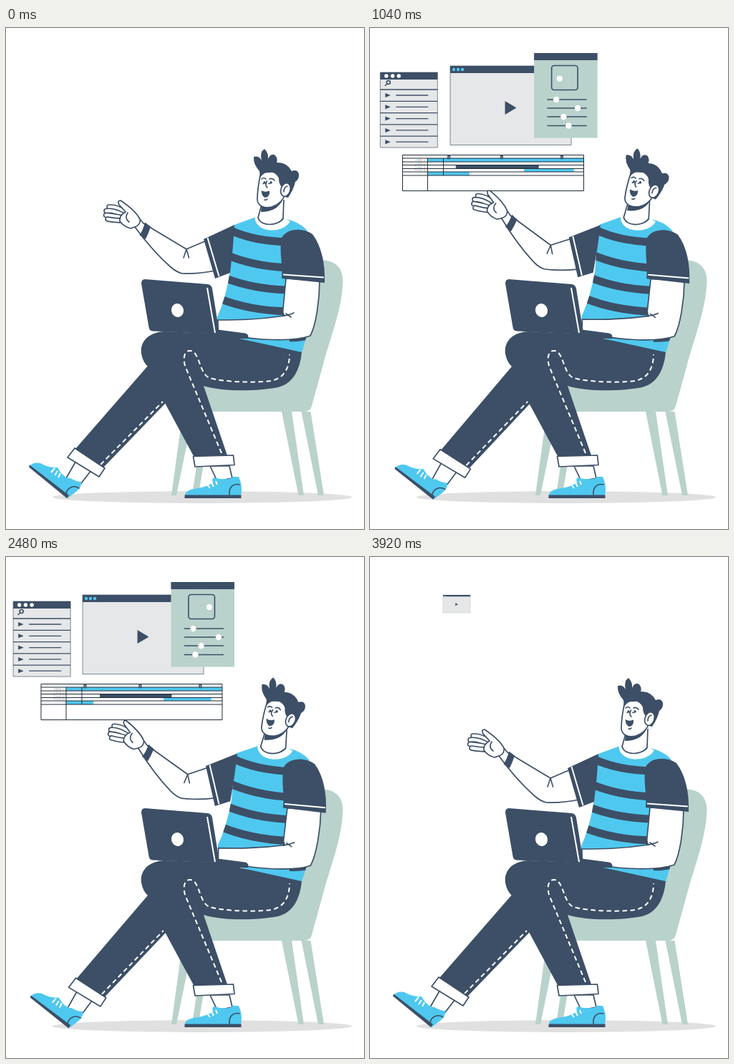
Animation of 500x700 px, one loop 4 s. Source, as an HTML page:

```html
<!DOCTYPE html>
<html lang="en">
<head>
<meta charset="utf-8">
<title>Video editor at work</title>
<style>
html, body { margin: 0; width: 100%; height: 100%; overflow: hidden; background: #fff; }
svg { display: block; width: 500px; height: 700px; }
.d { fill: #3c4f66; }
.b { fill: #4fc8ef; }
.g { fill: #b9d2cc; }
.w { fill: #fff; }
.s { fill: #e6e7e8; }
.o { fill: #fff; stroke: #3c4f66; stroke-width: 1.7; stroke-linejoin: round; }
.l { fill: none; stroke: #3c4f66; stroke-width: 1.6; stroke-linecap: round; }
.wl { fill: none; stroke: #fff; stroke-width: 2; }
.dash { stroke-dasharray: 6.5 4.5; }
.frame { stroke: #7d8792; stroke-width: 1; }
.row { stroke: #3c4f66; stroke-width: 1.3; }
.stripe { fill: none; stroke: #3c4f66; stroke-width: 11; }
.collar { fill: none; stroke: #fff; stroke-width: 9; }
.thin { fill: none; stroke: #222b38; stroke-width: 1; }
.finger { stroke-width: 7.5; }
.finger-fill { stroke-width: 4.3; stroke-linecap: round; }
text { font: 4.5px Arial, "Liberation Sans", sans-serif; fill: #aaa; }
</style>
</head>
<body>
<svg viewBox="0 0 500 700">
  <defs>
    <path id="shirt" d="M349 264L319 275Q315 300 313 340Q307 378 295 404L296 426L340 438L413 454L420 430L425 300L420 282Q408 270 391 267Z"/>
    <clipPath id="shirtClip"><use href="#shirt"/></clipPath>
  </defs>

  <ellipse cx="274" cy="655.5" rx="209" ry="8.5" fill="#e0e0e0"/>

  <g id="video">
    <path class="s frame" d="M0 0H169V110.500H0Z"/>
    <path class="d" d="M0 0H169V10H0ZM76.500 49V68L92.500 58.500Z"/>
    <g id="videoDots" class="b"></g>
  </g>
  <g id="list">
    <path class="s frame" d="M0-105H80V0H0Z"/>
    <path class="d" d="M0-105H80V-95H0Z"/>
    <circle class="l" cx="11.500" cy="-91" r="2.500"/><path class="l" d="M9.500-89L7-86.500"/>
    <g id="listRows"></g>
  </g>
  <g id="panel">
    <path class="g" d="M0 0H88.500V118.500H0Z"/>
    <path class="d" d="M0 0H88.500V10H0Z"/>
    <rect class="l" x="24.500" y="17.500" width="36.500" height="34" rx="3.500"/>
    <path class="l" d="M19 65H73M19 77H73M19 89H73M19 101.500H73"/>
    <g id="knobs" class="w"></g>
  </g>
  <g id="timeline">
    <path class="w" d="M0 0H253V50H0Z"/>
    <path class="b" d="M35 4.500H253V9.500H35Z"/>
    <g id="bars"></g>
    <path class="thin" d="M0 0H253V50H0ZM0 4.500H253M0 9.500H253M0 14H253M0 19H253M0 23.500H253M0 28.500H253M35 4.500V50M57 4.500V28.500"/>
    <g id="labels"></g>
    <g id="markers"></g>
  </g>

  <!-- chair -->
  <path class="g" d="M440 324C463 325 471 338 470.500 355C469 395 452 435 443 470L427 528Q425 536 416 536H250L270 490L400 450L400 330Z"/>
  <path class="g" d="M247 536H262L238 653H231ZM278 536H288L270 645H261ZM385 536H399L416 653H408.500ZM412.500 536H425.500L444 653H436Z"/>

  <g id="body">
    <g id="arm">
      <g id="fingers"></g>
      <path class="o" d="M312 290L280 297L252 309L192 273L187 267Q181 255 160 241Q155 241 158 247L167 257Q158 262 159 270Q165 278 174 280L180 278Q205 312 230 334Q238 341 246 343Q268 344 292 339L314 330Z"/>
      <path class="d" d="M194 271.500L202 277.500Q199 287 195 295L186.500 289.500Q192 281 194 271.500Z"/>
      <path class="l" d="M252 309L248 321M252 309L255.500 321M187 268Q188 275 180 278M170 258Q165 266 172 271"/>
    </g>
    <use href="#shirt" class="b"/>
    <g clip-path="url(#shirtClip)" class="stripe">
      <path d="M312 282Q345 298 395 299M308 317Q345 333 395 335M305 349Q345 365 395 366M298 378Q340 395 395 396"/>
      <path d="M396 434Q408 435 425 431" stroke-width="8"/>
    </g>
    <g id="sleeve">
      <path class="d" d="M319 275L276 295L292 350L313 342L317 305Z"/>
      <path class="wl" d="M281.500 293L297.500 347"/>
    </g>
    <path class="collar" d="M352 264C352 281 384 283 393 268"/>
    <path class="o" d="M357 247L352 265C356 278 380 277 387 266L388 240"/>
    <path class="o" d="M391 350L387 392Q386 399 389 402C350 408 320 408 296 408V424C335 437 400 439 425 430C433 415 438 380 438 352Z"/>
    <path class="l" d="M386 402.500Q396 401 402 398M391 399L398 404"/>
    <path class="d" d="M385 293C392 280 414 278 428 288C441 305 446 330 445 356L385 350C387 330 381 312 385 293Z"/>
    <path class="wl" d="M387 344.500L444 348.500"/>
    <g id="head">
      <path class="d" d="M357 247Q370 252 386 241Q378 257 356 257Z"/>
      <path class="o" d="M356 202C353 215 351 230 351 240C352 250 362 252 371 250C382 247 389 238 390 230L388 200Z"/>
      <path class="d" d="M355 209L354 200Q345 190 346 180Q353 178 357 185Q354 173 361 169Q367 175 366 183Q370 174 376 178Q380 183 378 188Q392 187 399 200Q407 197 409 204Q410 211 404 215Q402 225 394 237L386 235L385 222Q381 218 381 210Q378 203 370 201Q361 200 355 209Z"/>
      <ellipse class="o" cx="390.500" cy="226" rx="6.500" ry="9.500" transform="rotate(18 390.500 226)"/>
      <path class="l" d="M388 229Q388 222 393 221M357 211Q360 208 363 211M368 211Q372 209 375 213M364.500 214Q361 220 365 223M359 217.500L362 216.500M367 217.500L371 216.500M361 240Q363 241 365 239"/>
      <circle class="d" cx="361" cy="215.500" r="1.500"/><circle class="d" cx="370" cy="215.500" r="1.500"/>
      <path class="d" d="M356.500 227Q362 230 368 227.500Q369 236 362 237Q357 235 356.500 227Z"/>
    </g>
  </g>

  <!-- far leg, swings slightly at the knee -->
  <g id="leg">
    <path class="o" d="M99 603L84 629L102 640L119 618Z"/>
    <path class="b" d="M33 612Q38 606 48 608Q60 615 72 614L75 619Q82 629 90 629Q98 634 105.500 634Q106 641 99 647L86 657Z"/>
    <path class="d" d="M33 610.500L88 653L85 657L32 613.500Z"/>
    <path class="l" d="M84 651C85 642 95 638 102 643"/>
    <path class="wl" d="M63 621L68 615M68 625L72 619M73 628L76 622"/>
    <path class="d" d="M199 471L97 588L136 614L223 524L245 460Z"/>
    <path class="wl dash" d="M132 610L219 522"/>
    <path class="o" d="M96 587L138 615L130 627L86 600Z"/>
  </g>

  <!-- near leg -->
  <path class="o" d="M285 612L295 633L316 629L312 612Z"/>
  <path class="b" d="M250 653Q250 645 268 643Q281 641 289 635Q287 629 291 628Q299 631 306 630Q313 631 317 627L325 627Q331 640 328 653Z"/>
  <path class="d" d="M249.500 652.500H328.500V657H249.500Z"/>
  <path class="l" d="M312 652C311 641 318 636 326 638"/>
  <path class="wl" d="M281 638L285 643M287 635L290 641M293 633L295 638"/>
  <path class="d" d="M413 453L340 437L292 427L222 424C197 425 187 440 189 455Q191 467 199 474L222 524L263 600H310L276 500C300 508 350 508 380 502C402 497 411 475 413 453Z"/>
  <path class="wl dash" d="M301 594L250 472C246 456 252 450 258 451C271 453 270 485 285 489C305 495 350 496 370 493C388 490 396 475 396 456"/>
  <path class="o" d="M261.500 598.500L317.500 597L319 610.500L264 613Z"/>

  <!-- laptop -->
  <path class="d" d="M292 421L334 426.500Q340 428 338 434L320 434L292 428Z"/>
  <path class="d" d="M194 351L282 358Q287 359 288 364L297.500 423Q297 427 293 427.500L205 423.500Q200 423 199.500 418L189 357Q189 351 194 351Z"/>
  <path class="wl" d="M281 363L292 426"/>
  <ellipse class="w" cx="239.500" cy="394.500" rx="8.500" ry="9.500" transform="rotate(-15 239.500 394.500)"/>
</svg>
<script>
const $ = id => document.getElementById(id);
const LOOP = 4000, STEP = 80;
const smooth = u => (u = Math.max(0, Math.min(1, u)), u * u * (3 - 2 * u));
const deg = rad => rad * 180 / Math.PI;
const circle = (x, y, r) => `<circle cx="${x}" cy="${y}" r="${r}"/>`;
const rect = (cls, x, y, w, h) => `<rect class="${cls}" x="${x}" y="${y}" width="${w}" height="${h}"/>`;

// Eased value from [time, value, time, value, ...]
function track(t, ...k) {
  let i = 0;
  while (i < k.length - 4 && t > k[i + 2]) i += 2;
  return k[i + 1] + (k[i + 3] - k[i + 1]) * smooth((t - k[i]) / (k[i + 2] - k[i]));
}

$('videoDots').innerHTML = [5, 11, 17].map(x => circle(x, 5, 2.2)).join('');
$('listRows').innerHTML = '<g class="w">' + [8.5, 17.3, 26].map(x => circle(x, -100, 2.7)).join('') + '</g>' +
  [0, 1, 2, 3, 4].map(i => {
    const y = -81 + i * 16.3;
    return `<path class="row" d="M0 ${y}H80M22 ${y + 8}H67"/>
      <path class="d" d="M7 ${y + 5}V${y + 11}L14.500 ${y + 8}Z"/>`;
  }).join('');
$('labels').innerHTML = [1, 2, 3, 4].map(i => `<text x="17" y="${4.2 + i * 4.7}">Track ${i}</text>`).join('');
$('fingers').innerHTML = ['M167 258Q155 249 144 250', 'M163 261Q150 254 140 255.5',
  'M163 265Q150 262 139.5 261.5', 'M165 269Q152 269 142 267'].map(d =>
  `<path class="l finger" d="${d}"/><path class="wl finger-fill" d="${d}"/>`).join('');

function draw(t) {
  const edge = Math.min(t, LOOP - t);
  const wave = Math.cos(2 * Math.PI * t / LOOP);
  const place = (id, x, y, start) =>
    $(id).setAttribute('transform', `translate(${x} ${y}) scale(${smooth((edge - start) / 260)})`);
  const turn = (id, angle, x, y) => $(id).setAttribute('transform', `rotate(${deg(angle)} ${x} ${y})`);

  place('video', 115.7 - .0035 * t, 53, 0);
  place('list', 17.3 - .0029 * t, 167, 353);
  place('panel', 229 - 2 * wave, 35, 200);
  place('timeline', 43 + .0024 * t, 177.5, 120);

  const slide = (a, b, c) => track(t, 800, a, 1300, b, 2600, b, 3000, c);
  $('knobs').innerHTML = [
    [track(t, 800, 34.5, 1300, 37, 1800, 37, 2300, 53.5), track(t, 800, 42.5, 1300, 28, 1800, 28, 2300, 35)],
    [slide(31, 31, 53.5), 65], [slide(56, 66.5, 53.5), 77],
    [slide(40.5, 42, 35), 89], [slide(61, 34, 61.5), 101.5]
  ].map(([x, y]) => circle(x, y, 4.2)).join('');

  const inset = track(t, 640, 0, 1440, 15.5, 2480, 15.5, 3400, 0);
  const trim = track(t, 640, .5, 1440, 0, 3520, 3.5);
  const clip = track(t, 400, 63.5, 2600, 38, 2880, 38, 3700, 53);
  $('bars').innerHTML = rect('d', 66.5 + inset, 14, 131.5 - 2 * inset, 5) +
    rect('b', 169.5 + trim, 19, 70 - 2 * trim, 4.5) + rect('b', 35, 23.5, clip, 5);
  const playhead = track(t, 640, 65, 1440, 64.5, 2480, 61.5, 2880, 69.5, 3520, 62.5);
  $('markers').innerHTML = [playhead, 138.5, 222.5].map(x => rect('o', x - 1.2, .8, 2.4, 4)).join('');

  const lift = track(t, 0, 0, 720, .075, 1440, .093, 2480, .06, 2880, .125, 3440, .08, 3900, 0);
  turn('body', .0122 * (1 - wave), 365, 440);
  turn('arm', lift, 300, 290);
  turn('sleeve', lift * .6, 305, 290);
  turn('head', lift * 1.2, 375, 262);
  turn('leg', -.17 * lift, 220, 440);
}

function tick(now) {
  draw(Math.floor(now % LOOP / STEP) * STEP);
  requestAnimationFrame(tick);
}
draw(0);
requestAnimationFrame(tick);
</script>
</body>
</html>
```
